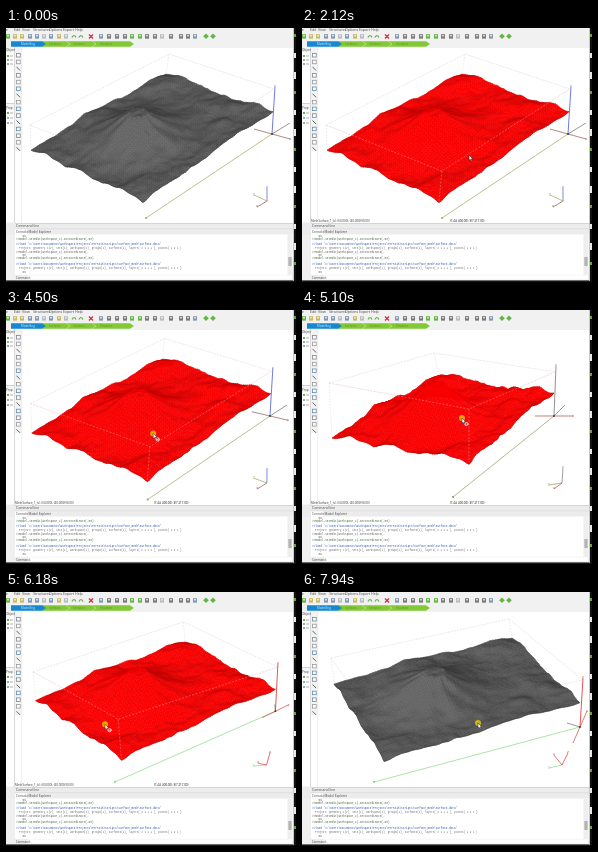
An HTML page with a canvas that plays this animation: 290 by 254 pixels, repeating every 7990 ms.

```html
<!DOCTYPE html>
<html lang="en">
<head>
<meta charset="utf-8">
<title>Terrain viewer</title>
<style>
html, body { margin: 0; width: 290px; height: 254px; overflow: hidden; background: #fff; }
svg, canvas { position: absolute; left: 0; top: 0; width: 290px; height: 254px; display: block; }
text { font-family: "Open Sans", sans-serif; white-space: pre; }
.mono { font-family: "Liberation Mono", monospace; }
</style>
</head>
<body>
<svg id="ui" viewBox="0 0 290 254"></svg>
<canvas id="view"></canvas>
<script>
const LOOP = 7990;
const ui = document.getElementById('ui');

function add(tag, attrs, text) {
  const el = document.createElementNS('http://www.w3.org/2000/svg', tag);
  for (const k in attrs) el.setAttribute(k, attrs[k]);
  if (text) el.textContent = text;
  ui.appendChild(el);
  return el;
}
const rect = (x, y, width, height, fill) => add('rect', { x, y, width, height, fill });
const label = (x, y, s, size = 3.8, fill = '#444', cls = '') =>
  add('text', { x, y, fill, 'font-size': size, class: cls }, s);

// ---- window chrome ----
function buildChrome() {
  rect(0, 0, 287, 20, '#f1f1f1');
  [[-4, 'File'], [8, 'Edit'], [16, 'View'], [27, 'Structures'], [43, 'Options'], [57, 'Export'], [69, 'Help']]
    .forEach(([x, s]) => label(x, 3.4, s, 3.6));

  const tint = { g: '#62b545', y: '#c9ba62', b: '#8298b0', k: '#777', r: '#d22e3c', w: '#b8bec4' };
  const xs = [2, 9, 16, 24, 31, 38, 45, 53, 60, 68, 75, 85, 95, 103, 111, 119, 126, 134, 141, 149, 156, 165, 175, 182, 189, 200, 207];
  [...'gyybbwbywggrbkkkggkkwkkkbgg'].forEach((c, i) => {
    const x = xs[i], fill = tint[c];
    if (c === 'r') {
      add('path', { d: `M${x - 2} 6.5l4 4m0-4l-4 4`, stroke: fill, 'stroke-width': 1.3 });
    } else if (i > 24) {
      add('path', { d: `M${x} 5.5l2.8 2.8l-2.8 2.8l-2.8-2.8z`, fill });
    } else if (i === 9 || i === 10) {
      add('path', { d: `M${x - 2} 9.5q2-4 4 0`, stroke: fill, fill: 'none', 'stroke-width': 1.2 });
    } else {
      rect(x - 2, 6.2, 4, 4.4, fill);
      rect(x - 1, 7.2, 2, 1.2, '#eef1f3');
    }
  });
  add('path', { d: 'M36 13.2H124L128 16L124 18.8H36z', fill: '#83c936' });
  add('path', { d: 'M5 13.2H36L40 16L36 18.8H5z', fill: '#1788cf' });
  add('path', { d: 'M60 13.2l4 2.8l-4 2.8M86 13.2l4 2.8l-4 2.8', fill: 'none', stroke: '#c9e9a8', 'stroke-width': .6 });
  label(15, 17.2, 'Modelling', 3, '#d8effb');
  label(43, 17.2, 'Surfaces', 3, '#5d9228');
  label(67, 17.2, 'Sections', 3, '#5d9228');
  label(94, 17.2, 'Visualise', 3, '#5d9228');

  // left panels
  rect(0, 19, 9, 176, '#f4f4f4');
  rect(0, 24, 8, 51, '#fff');
  rect(0, 82, 8, 112, '#fff');
  rect(8, 19, .6, 176, '#c5c5c5');
  rect(0, 75, 8, .6, '#bbb');
  label(0, 22.6, 'Object', 3);
  label(0, 80.6, 'Prop', 3);
  [27, 31, 35, 84, 89, 94].forEach((y, i) => {
    rect(1, y, 2, 2, i % 3 ? '#9aa' : '#6fae50');
    rect(4, y + .6, 3, .8, '#999');
  });
  rect(9, 20, 6.6, 103, '#f3f3f3');
  rect(15.6, 20, .5, 175, '#ddd');
  for (let i = 0; i < 15; i++) {
    const y = 25.5 + i * 6.7;
    const fill = ['#7d8790', '#999', '#638dab'][i % 3];
    if (i % 4 === 2) add('path', { d: `M10.5 ${y}l3.6 3.6`, stroke: '#555', 'stroke-width': .9 });
    else add('rect', { x: 10.5, y, width: 3.7, height: 3.5, fill: i === 10 ? '#4aa3d8' : '#fff', stroke: fill, 'stroke-width': .8 });
  }

  // console
  rect(0, 195, 287, 12, '#ececec');
  rect(9, 195, 278, .6, '#c6c6c6');
  label(10, 199.2, 'Command line', 3.4);
  rect(9, 200.6, 278, .5, '#d0d0d0');
  rect(9, 201.4, 12, 5, '#fff');
  label(10, 205, 'Console', 3.2);
  label(22.5, 205, 'Model Explorer', 3.2);
  rect(9, 206.5, 278, 40.5, '#fff');
  rect(0, 206.5, 9, 47.5, '#f0f0f0');
  const set = '>>model.setEdit(Workspace_1).SetCoordinate(-60)';
  const load = ">>load 'C:\\Users\\Documents\\Workspace\\Projects\\Terrain\\scripts\\surface_mesh\\surface.data'";
  const out = '  Project: geometry 1(v), sets(1), workspace(1), groups(1), surfaces(1), layers( 2 1 1 1 ), points( 1 2 1 )';
  [[208.7, '    OK'], [212.3, set, '#35633a'], [217.4, load, '#2450b0'], [221.4, out, '#666'],
   [225.3, set.slice(0, 44), '#555'], [228.3, '    OK'], [231.4, set, '#35633a'],
   [237.4, load, '#2450b0'], [241.4, out, '#666'], [245.2, '    OK']]
    .forEach(([y, s, c = '#555']) => label(10, y, s, s === out ? 2.58 : 2.75, c, 'mono'));
  rect(281.5, 206.5, 5, 40.5, '#eee');
  rect(282.3, 229, 3.4, 9, '#b5b5b5');
  rect(9, 246.8, 278, 5.5, '#ededed');
  rect(22, 247.4, 264, 4, '#fff');
  label(10, 250.7, 'Command:', 2.8);
  rect(0, 252.4, 290, 1.6, '#151515');

  // right screen edge
  rect(287, 0, .8, 253, '#bbb');
  rect(288, 0, 2, 254, '#111');
  for (let i = 0; i < 13; i++) rect(288, 6 + i * 19, 2, 3 + i % 3 * 2, i % 3 ? '#e8e8e8' : '#6f9f3c');
}
buildChrome();

const status = [
  label(9, 193.6, 'MeshSurface_1_(v): (60.000): (40.000)(90.00)', 2.9, '#333'),
  label(148, 193.6, '(7.44: 400.00): $(7.217.00)', 2.9, '#111')
];

// ---- camera poses: corners run left, back, right, front ----
const poses = [
  { at: 4400, lift: [28],
    land: [25, 120, 160, 46, 267, 83, 137, 173], box: [24, 97, 163, 26, 268, 61, 140, 143],
    axes: [266, 106, 269, 59, 140, 190, 284, 111, 284, 95], triad: [261, 173, 261, 160, 248, 167, 251, 179],
    up: '#4b58d8', line: '#a3a35a', cross: '#8a5a4a' },
  { at: 5100, lift: [40],
    land: [30, 125, 137, 67, 252, 82, 167, 152], box: [27, 73, 132, 43, 253, 62, 167, 99],
    axes: [252, 106, 254, 56, 151, 187, 271, 106, 263, 95], triad: [260, 173, 261, 158, 247, 175, 252, 179],
    up: '#777', line: '#8f9a62', cross: '#b04a4a' },
  { at: 5810, lift: [34],
    land: [27, 124, 145, 54, 260, 82, 152, 165], box: [25, 95, 145, 33, 262, 61, 153, 124],
    axes: [260, 102, 262, 56, 149, 190, 280, 106, 273, 92], triad: [261, 173, 262, 160, 248, 172, 252, 180],
    up: '#777', line: '#86a574', cross: '#b04a4a' },
  { at: 6520, lift: [27],
    land: [32, 90, 210, 46, 278, 110, 82, 168], box: [29, 66, 207, 27, 281, 88, 75, 130],
    axes: [278, 135, 281, 86, 72, 190, 285, 119, 265, 131], triad: [260, 173, 266, 161, 247, 176, 252, 163],
    up: '#e02a2a', line: '#86d886', cross: '#d84040' }
];

function poseAt(t) {
  const last = poses.length - 1;
  if (t <= poses[0].at) return poses[0];
  if (t >= poses[last].at) return poses[last];
  const i = poses.findIndex(p => p.at > t);
  const a = poses[i - 1], b = poses[i], k = (t - a.at) / (b.at - a.at);
  const pose = { ...(k < .5 ? a : b) };
  for (const key of ['lift', 'land', 'box', 'axes', 'triad'])
    pose[key] = a[key].map((n, j) => n + (b[key][j] - n) * k);
  return pose;
}

// ---- height field ----
const NU = 64, NV = 56;
const hash = (x, y) => { const s = Math.sin(x * 127.1 + y * 311.7) * 43758.5453; return s - Math.floor(s); };
const smooth = x => x * x * (3 - 2 * x);
function noise(x, y) {
  const i = Math.floor(x), j = Math.floor(y), a = smooth(x - i), b = smooth(y - j);
  return (hash(i, j) * (1 - a) + hash(i + 1, j) * a) * (1 - b) +
         (hash(i, j + 1) * (1 - a) + hash(i + 1, j + 1) * a) * b - .5;
}
const hill = (u, v, cu, cv, r) => Math.exp(-((u - cu) ** 2 + (v - cv) ** 2) / (r * r));

function heightAt(u, v) {
  const x = (u - .42) * 1.2, y = v - .455, r = Math.hypot(x, y), ang = Math.atan2(y, x);
  const cone = Math.max(0, 1 - Math.max(r, .055) / .46) ** 1.7 * 1.15;
  const gully = Math.cos(ang * 11 + r * 9) * .035 * Math.min(1, r * 7) * Math.max(0, 1 - r / .45);
  const crater = r < .055 ? -.06 * Math.cos(ang - 1) * (1 - r / .055) - .03 : 0;
  const rough = noise(u * 7, v * 7) * .14 + noise(u * 16 + 5, v * 16) * .08 + noise(u * 33, v * 33 + 9) * .035;
  const hills = .17 * hill(u, v, .9, .72, .07) + .14 * hill(u, v, .77, .8, .06) +
                .16 * hill(u, v, .42, .04, .09) + .12 * hill(u, v, .9, .08, .1);
  return cone + gully + crater + rough * (1 - cone * .7) + hills;
}

const heights = [], shades = [];
for (let i = 0; i <= NU; i++) {
  heights.push([]);
  for (let j = 0; j <= NV; j++) heights[i].push(heightAt(i / NU, j / NV));
}
for (let i = 0; i < NU; i++) {
  shades.push([]);
  for (let j = 0; j < NV; j++) {
    const du = (heights[i + 1][j] - heights[i][j]) * NU, dv = (heights[i][j + 1] - heights[i][j]) * NV;
    shades[i].push(Math.max(-24, Math.min(20, du * 5 - dv * 5.5)));
  }
}

// ---- drawing ----
const canvas = document.getElementById('view');
const dpr = window.devicePixelRatio || 1;
canvas.width = 290 * dpr;
canvas.height = 254 * dpr;
const c = canvas.getContext('2d');
c.scale(dpr, dpr);

function stroke(pts, color, width = .7, dash = []) {
  c.beginPath();
  for (let i = 0; i < pts.length; i += 2) c.lineTo(pts[i], pts[i + 1]);
  c.strokeStyle = color;
  c.lineWidth = width;
  c.setLineDash(dash);
  c.stroke();
  c.setLineDash([]);
}
const at = (list, i) => list.slice(i * 2, i * 2 + 2);

function drawLand(pose, red) {
  const [lx, ly, bx, by, rx, ry, fx, fy] = pose.land, lift = pose.lift[0];
  const mix = (l, b, r, f, u, v) => (l * (1 - u) + b * u) * (1 - v) + (f * (1 - u) + r * u) * v;
  const grid = heights.map((row, i) => row.map((h, j) => {
    const u = i / NU, v = j / NV;
    return [mix(lx, bx, rx, fx, u, v), mix(ly, by, ry, fy, u, v) - h * lift];
  }));
  c.lineWidth = .6;
  for (let i = NU - 1; i >= 0; i--) {
    for (let j = 0; j < NV; j++) {
      const s = shades[i][j], g = Math.round(81 + s);
      const color = red ? `rgb(${Math.min(250, Math.round(236 + s * 2.4))},0,0)` : `rgb(${g},${g},${g})`;
      c.beginPath();
      c.moveTo(...grid[i][j]);
      c.lineTo(...grid[i + 1][j]);
      c.lineTo(...grid[i + 1][j + 1]);
      c.lineTo(...grid[i][j + 1]);
      c.closePath();
      c.fillStyle = c.strokeStyle = color;
      c.fill();
      c.stroke();
    }
  }
  const rim = red ? 'rgba(150,0,0,.55)' : 'rgba(45,45,45,.6)';
  stroke(grid[0].flat(), rim, .6);
  stroke(grid.map(row => row[NV]).flat(), rim, .6);
}

function drawScene(pose, red) {
  const { box, axes, triad, land } = pose;
  const [L, B, R, F] = [0, 1, 2, 3].map(i => at(box, i));
  const [O, up, end, x, y] = [0, 1, 2, 3, 4].map(i => at(axes, i));
  const front = [...L, ...F, ...R], post = [...F, ...at(land, 3)];
  stroke([...L, ...B, ...R], '#d2d2d2', .5, [2, 1]);
  stroke([...B, ...at(land, 1)], '#ddd', .5, [2, 1]);
  stroke([...L, ...at(land, 0)], '#ddd', .5, [2, 1]);
  stroke(front, '#d8d8d8', .5, [2, 1]);
  stroke([...end, ...O], pose.line, .7);
  drawLand(pose, red);
  const veil = red ? 'rgba(255,190,190,.75)' : 'rgba(200,200,200,.1)';
  stroke(front, veil, .5, [2, 1.5]);
  stroke(post, veil, .5, [2, 1.5]);

  stroke([...O, ...up], pose.up, .8);
  stroke([2 * O[0] - x[0], 2 * O[1] - x[1], ...x], pose.cross, .7);
  stroke([...O, ...y], '#667060', .7);
  c.fillStyle = '#333';
  c.fillRect(O[0] - .8, O[1] - .8, 1.6, 1.6);
  c.fillStyle = pose.line;
  c.fillRect(end[0] - .8, end[1] - 1, 1.8, 1.8);
  c.font = '4px "Open Sans", sans-serif';
  c.fillStyle = pose.up;
  c.fillText('z', up[0] - 1, up[1]);
  c.fillStyle = pose.cross;
  c.fillText('x', x[0] - 1, x[1] + 1);

  const T = at(triad, 0);
  [pose.up, pose.line, pose.cross].forEach((color, i) => {
    const p = at(triad, i + 1);
    stroke([...T, ...p], color, .7);
    c.fillStyle = color;
    c.fillText('zyx'[i], p[0] - 1, p[1]);
  });
}

// ---- pointer: time, x, y ----
const path = [
  [720, 273, 231], [900, 206, 149], [1100, 206, 149], [1480, 158, 122], [1850, 168, 128],
  [2120, 167, 127], [2680, 175, 139], [2820, 183, 147], [3070, 183, 147], [3750, 144, 125],
  [4400, 145, 126], [5100, 160, 108], [5810, 128, 127], [6450, 78, 136], [6740, 130, 128],
  [7120, 150, 112], [7500, 216, 134], [7940, 176, 131], [LOOP, 176, 131]
];
const within = (t, spans) => spans.some(([a, b]) => t >= a && t < b);
const pressed = [[1840, 1920], [3800, 3890], [4400, 6420], [7880, LOOP]];
const selected = [[1920, 3200], [3870, 7080]];

function drawPointer(t) {
  if (t < 720) return;
  const i = Math.max(1, path.findIndex(p => p[0] > t));
  const [t0, x0, y0] = path[i - 1], [t1, x1, y1] = path[i];
  const k = (t - t0) / (t1 - t0), x = x0 + (x1 - x0) * k, y = y0 + (y1 - y0) * k;
  const drag = within(t, [pressed[2]]);
  if (within(t, pressed)) {
    c.beginPath();
    c.arc(x, y, 3, 0, Math.PI * 2);
    c.fillStyle = 'rgba(236,205,0,.78)';
    c.fill();
  }
  c.save();
  c.translate(x, y);
  if (drag) {
    c.beginPath();
    c.arc(4.5, 6, 1.6, 0, Math.PI * 2);
    c.strokeStyle = '#fff';
    c.lineWidth = .8;
    c.stroke();
    stroke([2, 6, 7, 6], '#eee', .6);
  }
  c.beginPath();
  [[0, 0], [0, 5.2], [1.2, 4.2], [2.1, 6], [3, 5.6], [2.2, 3.8], [3.7, 3.7]].forEach(p => c.lineTo(...p));
  c.closePath();
  c.fillStyle = '#fff';
  c.strokeStyle = '#222';
  c.lineWidth = .5;
  c.fill();
  c.stroke();
  c.restore();
}

function frame(now) {
  const t = now % LOOP;
  c.clearRect(0, 0, 290, 254);
  drawScene(poseAt(t), within(t, selected));
  drawPointer(t);
  const shown = t >= 1400 && t < 7190 ? 'visible' : 'hidden';
  status.forEach(el => el.setAttribute('visibility', shown));
  requestAnimationFrame(frame);
}
frame(performance.now());
</script>
</body>
</html>
```
